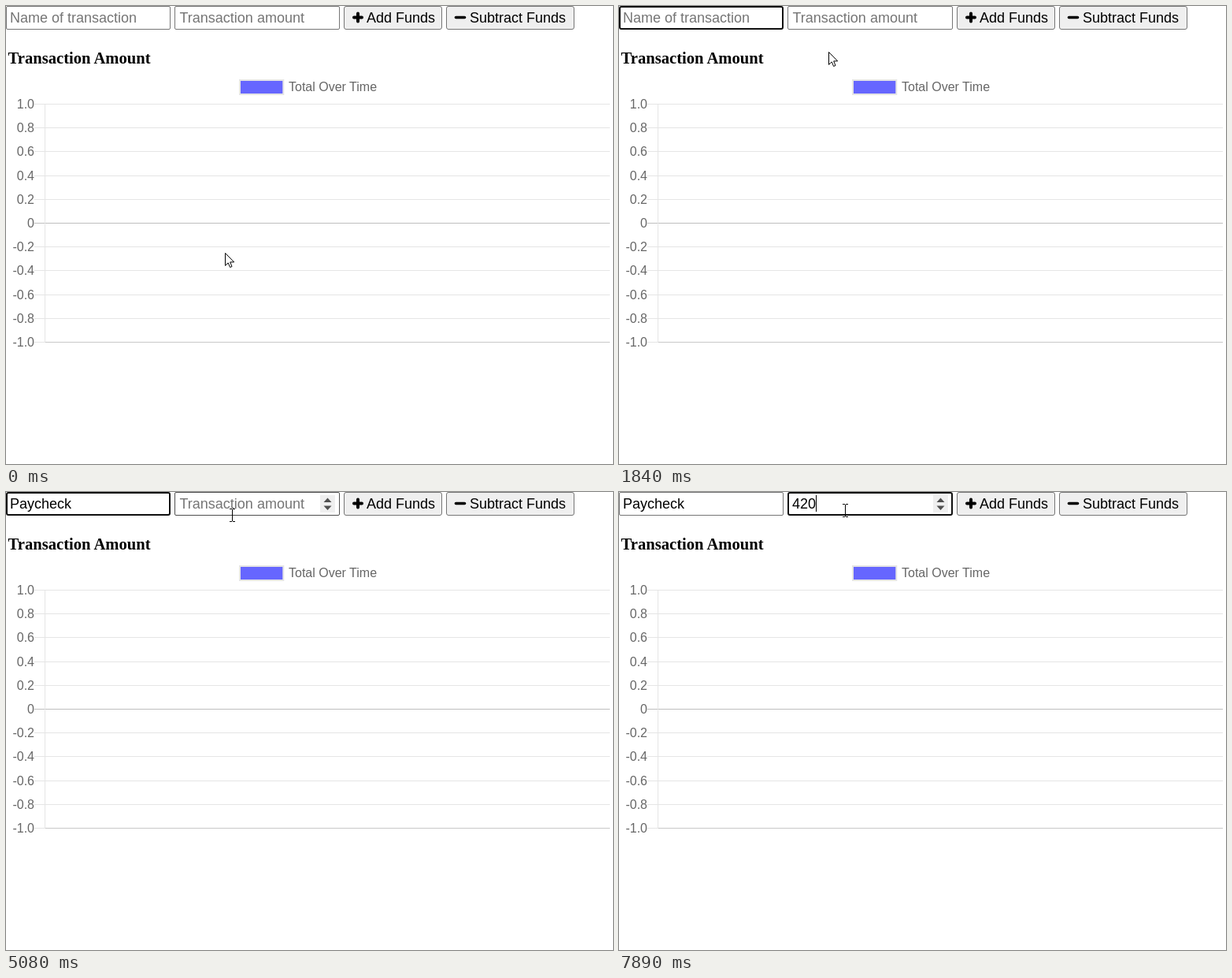
Animation, 771 px wide and 581 px high, one loop 8 s. Source, as an HTML page:

```html
<!DOCTYPE html>
<html lang="en">
<head>
<meta charset="utf-8">
<title>Transaction form</title>
<style>
  html, body { margin: 0; width: 100%; height: 100%; overflow: hidden; background: #fff; }
  svg { display: block; width: 771px; height: 581px; }
  text { white-space: pre; }
  .ui { font: 18px "Liberation Sans", Arial, sans-serif; }
  .heading { font: bold 20.6px "Liberation Serif", "Times New Roman", serif; }
  .chart { font: 16px "Liberation Sans", Arial, sans-serif; fill: #666; }
  .button { fill: #efefef; stroke: #767676; }
</style>
</head>
<body>
<svg id="stage" viewBox="0 0 771 581">
  <g id="fields"></g>

  <rect class="button" x="429.5" y=".5" width="124" height="29" rx="2.5"/>
  <path d="M447 9.5V19.5M442 14.5H452" stroke="#000" stroke-width="4" stroke-linecap="round"/>
  <text class="ui" x="458" y="21">Add Funds</text>
  <rect class="button" x="559.5" y=".5" width="162" height="29" rx="2.5"/>
  <path d="M571.5 14.5H582.5" stroke="#000" stroke-width="3.6" stroke-linecap="round"/>
  <text class="ui" x="589" y="21">Subtract Funds</text>

  <text class="heading" x="2.6" y="73">Transaction Amount</text>

  <rect x="298" y="95" width="53.3" height="16" fill="none" stroke="#0000001a" stroke-width="4"/>
  <rect x="298" y="95" width="53.3" height="16" fill="#6666ff"/>
  <text class="chart" x="359" y="108">Total Over Time</text>
  <g id="grid" shape-rendering="crispEdges"></g>

  <path id="arrow" d="M.5 .5V16.4L4.2 12.9L6.6 18.5L9 17.5L6.7 11.9H11.7Z" fill="#fff" stroke="#000"/>
  <path id="beam" d="M-3 -7.5H0M1 -7.5H4M.5 -7V8M-3 8.5H0M1 8.5H4" stroke="#000" fill="none" shape-rendering="crispEdges"/>
</svg>
<script>
const LOOP = 8000;
const $ = id => document.getElementById(id);

function add(parent, tag, attrs, content = '') {
  const el = document.createElementNS('http://www.w3.org/2000/svg', tag);
  for (const key in attrs) el.setAttribute(key, attrs[key]);
  el.textContent = content;
  return parent.appendChild(el);
}

function set(el, attrs) {
  for (const key in attrs) el.setAttribute(key, attrs[key]);
}

function buildGrid() {
  const line = (d, stroke) => add($('grid'), 'path', { d, stroke });
  for (let i = 0; i <= 10; i++) {
    const y = Math.round(124 + 30.2 * i) + .5;
    const value = (10 - 2 * i) / 10;
    line(`M36 ${y}H767`, value ? '#e5e5e5' : '#bfbfbf');
    add($('grid'), 'text', { class: 'chart', x: 36, y: y + 5.5, 'text-anchor': 'end' },
      value ? value.toFixed(1) : '0');
  }
  line('M49.5 124V427', '#e5e5e5');
  line('M50 426.5H767', '#c8c8c8');
}

function makeField(x, width, textX, placeholder, spins) {
  const group = add($('fields'), 'g', {});
  const frame = add(group, 'rect', { fill: '#fff' });
  const label = add(group, 'text', { class: 'ui', y: 21 });
  const caret = add(group, 'rect', { y: 4, width: 1, height: 21 });
  const spinner = add(group, 'g', {});
  if (spins) {
    add(spinner, 'rect', { x: 399, y: 4, width: 19, height: 22, fill: '#efefef' });
    add(spinner, 'path', { d: 'M403.5 13L408.5 7.5L413.5 13ZM403.5 17.5H413.5L408.5 23Z', fill: '#505050' });
  }
  return (value, focused, hovered, caretOn) => {
    const inset = focused ? 1 : .5;
    set(frame, {
      x: x + inset, y: inset, width: width - 2 * inset, height: 30 - 2 * inset,
      rx: focused ? 2 : 1.5, 'stroke-width': 2 * inset,
      stroke: focused ? '#101010' : hovered ? '#4f4f4f' : '#767676'
    });
    label.textContent = value || placeholder;
    set(label, { x: value ? textX : textX + (spins ? .5 : 0), fill: value ? '#000' : '#757575' });
    const end = value ? label.getComputedTextLength() : 0;
    set(caret, { x: Math.round(textX + end), visibility: focused && caretOn ? 'visible' : 'hidden' });
    set(spinner, { visibility: hovered || focused ? 'visible' : 'hidden' });
  };
}

// Each step changes some of the state and holds until the next one.
const steps = [
  [0, { pointer: 'arrow', at: [278, 313], hover: '', focus: '', caret: false, name: '', amount: '' }],
  [200, { at: [262, 288] }],
  [400, { at: [210, 192] }],
  [600, { at: [142, 84] }],
  [810, { pointer: 'beam', at: [104, 18], hover: 'name' }],
  [1010, { at: [99, 11] }],
  [1210, { focus: 'name', caret: true }],
  [1410, { pointer: 'arrow', at: [214, 46], hover: '' }],
  [1640, { at: [277, 57] }],
  [1840, { at: [266, 58], caret: false }],
  [2230, { caret: true }],
  [2840, { caret: false }],
  [3250, { caret: true }],
  [3460, { name: 'P' }],
  [3670, { name: 'Pay' }],
  [4060, { name: 'Paych' }],
  [4260, { name: 'Paychec' }],
  [4460, { name: 'Paycheck' }],
  [4880, { at: [274, 48] }],
  [5080, { pointer: 'beam', at: [287, 29], hover: 'amount', caret: false }],
  [5280, { at: [287, 23], focus: 'amount', caret: true }],
  [5880, { caret: false }],
  [6280, { caret: true }],
  [6890, { caret: false }],
  [7090, { amount: '4', caret: true }],
  [7490, { caret: false }],
  [7690, { amount: '42', caret: true }],
  [7890, { amount: '420' }]
];

const fields = {
  name: makeField(0, 209, 5, 'Name of transaction', false),
  amount: makeField(214, 210, 220, 'Transaction amount', true)
};
buildGrid();

function render(time) {
  const state = Object.assign({}, ...steps.filter(([start]) => start <= time).map(step => step[1]));
  for (const key in fields) {
    fields[key](state[key], state.focus === key, state.hover === key, state.caret);
  }
  for (const id of ['arrow', 'beam']) {
    set($(id), {
      transform: `translate(${state.at})`,
      visibility: state.pointer === id ? 'visible' : 'hidden'
    });
  }
}

const origin = performance.now();
function tick() {
  render((performance.now() - origin) % LOOP);
  requestAnimationFrame(tick);
}
tick();
</script>
</body>
</html>
```
